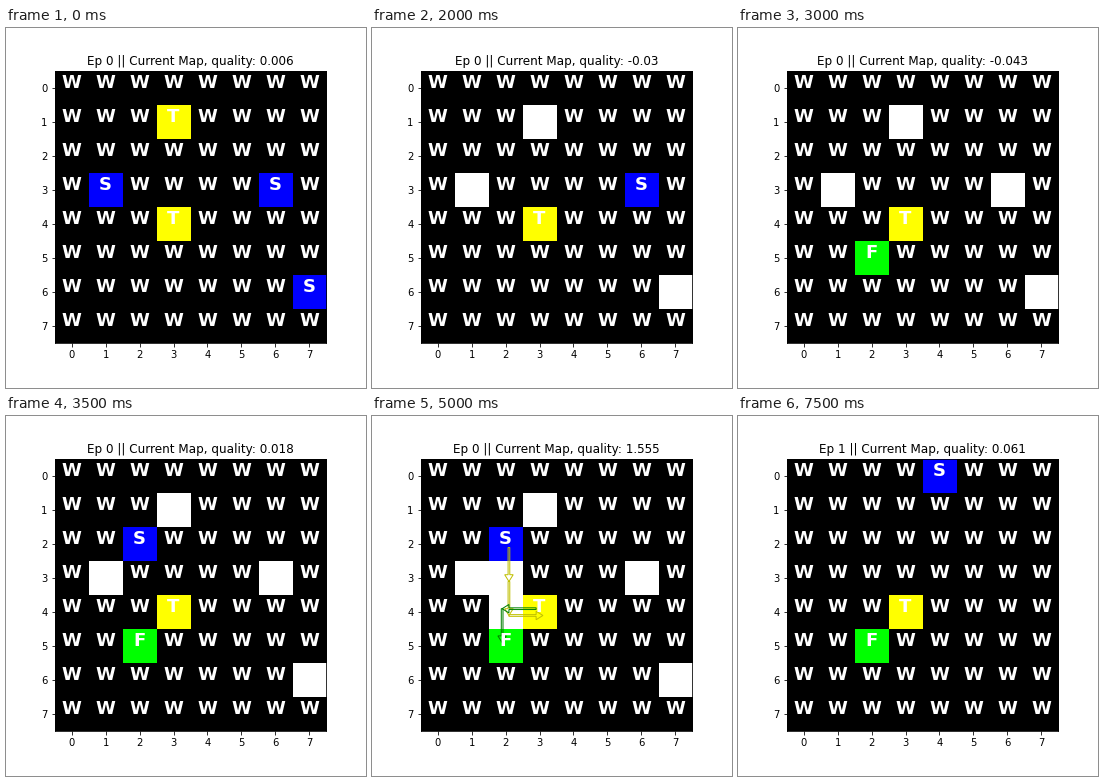
Animation of 360x360 px, one loop 8 s. Source, as a matplotlib script:

```python
import matplotlib.pyplot as plt
import numpy as np
from matplotlib.animation import FuncAnimation

SIZE, N = 360, 8
STEP_MS, STEPS = 500, 16
COLORS = {"W": (0, 0, 0), "S": (0, 0, 1), "T": (1, 1, 0),
          "F": (0, 1, 0), " ": (1, 1, 1)}

# (step, episode, quality, cells placed as (column, row, kind))
EVENTS = [
    (0, 0, 0.006, [(3, 1, "T"), (3, 4, "T"), (1, 3, "S"), (6, 3, "S"), (7, 6, "S")]),
    (2, 0, 0.012, [(7, 6, " ")]),
    (3, 0, 0.025, [(1, 3, " ")]),
    (4, 0, -0.03, [(3, 1, " ")]),
    (5, 0, 0.016, [(2, 5, "F")]),
    (6, 0, -0.043, [(6, 3, " ")]),
    (7, 0, 0.018, [(2, 2, "S")]),
    (8, 0, -0.002, [(2, 3, " ")]),
    (9, 0, 1.555, [(2, 4, " ")]),
    (13, 1, 0.007, [(4, 0, "S"), (3, 4, "T")]),
    (15, 1, 0.061, [(2, 5, "F")]),
]
ARROW_STEPS = range(10, 13)
ROUTES = [("y", 0.1, [(2, 2), (2, 3), (2, 4), (3, 4)]),
          ("g", -0.1, [(3, 4), (2, 4), (2, 5)])]

fig, ax = plt.subplots(figsize=(SIZE / 72, SIZE / 72), dpi=72, facecolor="white")
fig.subplots_adjust(left=0.125, right=0.9, bottom=0.125, top=0.88)
image = ax.imshow(np.zeros((N, N, 3)), interpolation="nearest")
ax.set_xticks(range(N))
ax.set_yticks(range(N))
title = ax.set_title("", fontsize=12)
labels = [[ax.text(x, y, "W", color="white", fontsize=18, weight="bold", ha="center")
           for x in range(N)] for y in range(N)]


def draw_route(color, shift, cells):
    return [ax.arrow(x0 + shift, y0 + shift, x1 - x0, y1 - y0, width=0.05,
                     head_width=0.25, head_length=0.2, length_includes_head=True,
                     fc="none", ec=color)
            for (x0, y0), (x1, y1) in zip(cells, cells[1:])]


arrows = [a for route in ROUTES for a in draw_route(*route)]


def board_at(step):
    grid = [["W"] * N for _ in range(N)]
    past = [e for e in EVENTS if e[0] <= step]
    episode, quality = past[-1][1:3]
    for _, ep, _, cells in past:
        if ep == episode:
            for x, y, kind in cells:
                grid[y][x] = kind
    return episode, quality, grid


def update(step):
    episode, quality, grid = board_at(step)
    title.set_text(f"Ep {episode} || Current Map, quality: {quality}")
    image.set_data(np.array([[COLORS[k] for k in row] for row in grid], dtype=float))
    for row, kinds in zip(labels, grid):
        for label, kind in zip(row, kinds):
            label.set_text(kind)
    for arrow in arrows:
        arrow.set_visible(step in ARROW_STEPS)
    return [image, title, *arrows]


anim = FuncAnimation(fig, update, frames=STEPS, interval=STEP_MS, repeat=True,
                     repeat_delay=0, blit=False)
plt.show()
```
